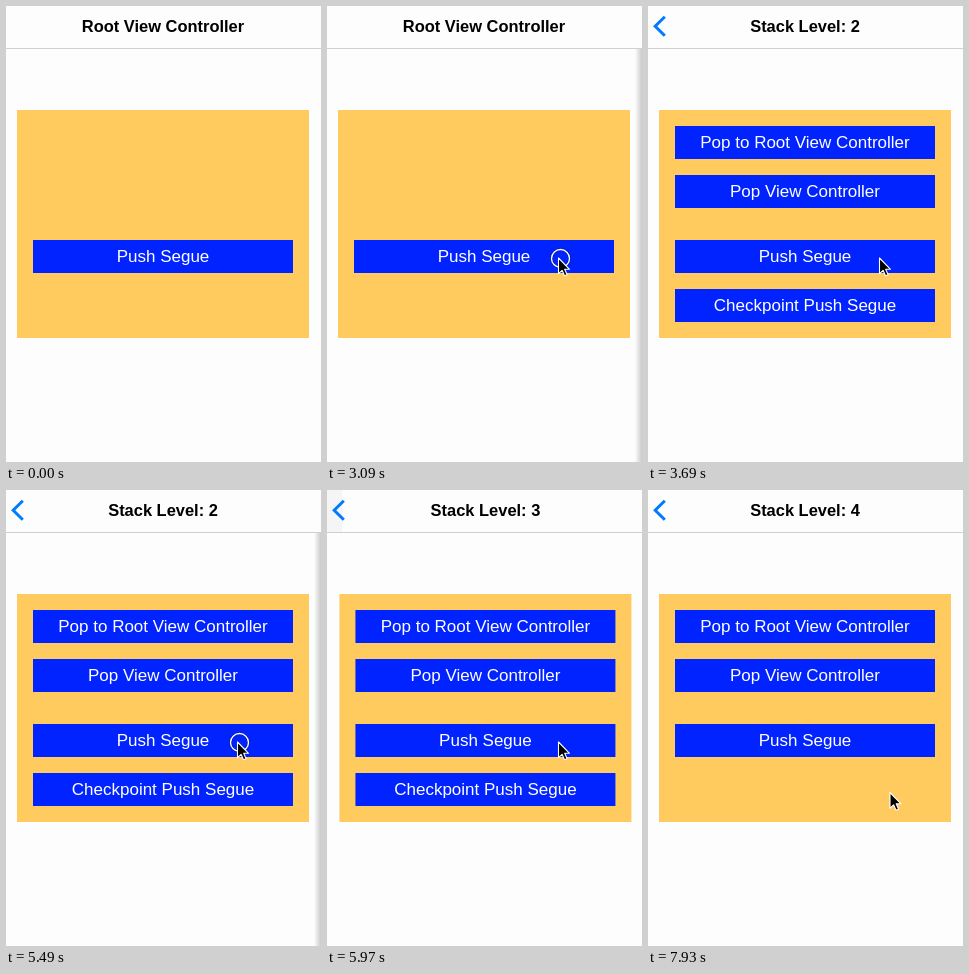
Animation, 315 px wide and 456 px high, one loop 8000 ms. Source, as an HTML page:

```html
<!DOCTYPE html>
<html lang="en">
<head>
<meta charset="utf-8">
<title>Navigation stack</title>
<style>
  html, body { margin: 0; width: 100%; height: 100%; overflow: hidden; background: #fdfdfd; }
  svg { display: block; width: 100%; height: 100%; }
  text { font-family: "Liberation Sans", Arial, sans-serif; text-anchor: middle; }
  .label { font-size: 17px; fill: #fff; }
  .title { font-size: 16.45px; font-weight: bold; fill: #000; }
</style>
</head>
<body>
<svg id="stage" viewBox="0 0 315 456" xmlns="http://www.w3.org/2000/svg">
  <defs>
    <linearGradient id="shade">
      <stop offset="0" stop-color="#000" stop-opacity="0"/>
      <stop offset="1" stop-color="#000"/>
    </linearGradient>
  </defs>
  <g id="views"></g>
  <rect id="bar" width="315" height="42" fill="#fdfdfd"/>
  <rect id="tint" width="0" height="42"/>
  <rect y="42" width="315" height="1" fill="#d0d0d0"/>
  <g id="titles"></g>
  <path id="back" d="M16.8 10.8L7.2 20.3L16.8 29.8" fill="none" stroke="#007aff" stroke-width="3"/>
  <g id="ring" fill="none">
    <circle r="9" stroke="#000" stroke-opacity=".4" stroke-width="2.6"/>
    <circle r="9" stroke="#fff" stroke-width="1.4"/>
  </g>
  <path id="cursor" d="M0 0V15.6L3.6 12.3L6 17.8L8.6 16.7L6.2 11.3H11Z"
        fill="#000" stroke="#fff" stroke-width="1.1" stroke-linejoin="round"/>
</svg>
<script>
const LOOP = 8000, STEP = 60, WIDTH = 320, INSET = 3, MID = 157;
const $ = id => document.getElementById(id);

function add(parent, tag, attrs, text) {
  const el = document.createElementNS("http://www.w3.org/2000/svg", tag);
  for (const k in attrs) el.setAttribute(k, attrs[k]);
  if (text) el.textContent = text;
  parent.appendChild(el);
  return el;
}

const set = (el, attrs) => { for (const k in attrs) el.setAttribute(k, attrs[k]); };
const show = (el, on) => set(el, { visibility: on ? "visible" : "hidden" });
const clamp = v => Math.max(0, Math.min(1, v));
const smooth = u => u * u * (3 - 2 * u);

const PUSH = ["Push Segue", 234];
const POPS = [["Pop to Root View Controller", 120], ["Pop View Controller", 169]];
const CHECK = ["Checkpoint Push Segue", 283];

const screens = [
  ["Root View Controller", [PUSH]],
  ["Stack Level: 2", [...POPS, PUSH, CHECK]],
  ["Stack Level: 3", [...POPS, PUSH, CHECK]],
  ["Stack Level: 4", [...POPS, PUSH]]
].map(([name, buttons]) => {
  const view = add($("views"), "g", {});
  const shadow = add(view, "rect", { x: -INSET - 9, y: 43, width: 9, height: 413, fill: "url(#shade)" });
  add(view, "rect", { x: -INSET, width: WIDTH, height: 456, fill: "#fdfdfd" });
  add(view, "rect", { x: 11, y: 104, width: 292, height: 228, fill: "#ffcb5f" });
  for (const [label, y] of buttons) {
    add(view, "rect", { x: 27, y, width: 260, height: 33, fill: "#0023ff" });
    add(view, "text", { x: MID, y: y + 22, class: "label" }, label);
  }
  const dim = add(view, "rect", { x: -INSET, width: WIDTH, height: 456 });
  const title = add($("titles"), "text", { x: MID, y: 26, class: "title" }, name);
  return { view, shadow, dim, title };
});

// click: time of the tap, start: when the slide begins
const pushes = [
  { click: 3090, start: 3197, end: 3690 },
  { click: 5490, start: 5550, end: 6090 },
  { click: 7390, start: 7402, end: 7930 }
];

function slide(t, { click, start, end }) {
  if (t >= end) return 1;
  const x = 0.018 * (click + Math.floor((t - click) / STEP) * STEP - start);
  return x <= 0 ? 0 : 1 - (1 + x) * Math.exp(-x);
}

function pointer(t) {
  if (t < 6330) {
    const u = smooth(clamp(Math.floor((t - 720) / 57.2) / 11)), v = 1 - u;
    return [
      209 * v * v + 2 * 209 * u * v + 231.5 * u * u,
      434 * v * v + 2 * 330 * u * v + 252 * u * u
    ];
  }
  const u = smooth(clamp((Math.floor((t - 6330) / 56.6) + 1) / 7));
  return [231.5 + 10.5 * u, 252 + 50.5 * u];
}

function place(s, x, dim, shadow, titleX, titleAlpha) {
  set(s.view, { transform: `translate(${x} 0)` });
  set(s.dim, { opacity: dim });
  set(s.shadow, { opacity: shadow });
  set(s.title, { transform: `translate(${titleX} 0)`, opacity: titleAlpha });
}

function draw(t) {
  const k = pushes.filter(p => t >= p.click).length;
  const p = k ? slide(t, pushes[k - 1]) : 1;
  const q = 1 - p, moving = p > 0 && p < 1;

  screens.forEach((s, i) => {
    const on = i === k || (i === k - 1 && p < 1);
    show(s.view, on);
    show(s.title, on);
    if (i === k) {
      place(s, WIDTH * q, 0, 0.26 * q, 228 * Math.pow(q, 0.934), p);
    } else if (on) {
      place(s, -0.3 * WIDTH * p, 0.1 * p, 0, (i ? -57 : -49) * p, Math.pow(q, 1.7));
    }
  });

  set($("bar"), { fill: moving && p < 0.98 ? "#fafafa" : "#fdfdfd" });
  set($("tint"), { width: moving ? Math.min(315, WIDTH * q + 14) : 0, opacity: 0.03 * p });
  set($("back"), { opacity: k === 0 ? 0 : k === 1 ? Math.pow(p, 5) : 1 });

  const [x, y] = pointer(t);
  show($("cursor"), t >= 720);
  set($("cursor"), { transform: `translate(${x} ${y})` });
  show($("ring"), pushes.some(c => t >= c.click && t < c.click + STEP));
  set($("ring"), { transform: `translate(${x + 2} ${y + 0.5})` });
}

const t0 = performance.now();
function tick() {
  draw((performance.now() - t0) % LOOP);
  requestAnimationFrame(tick);
}
tick();
</script>
</body>
</html>
```
